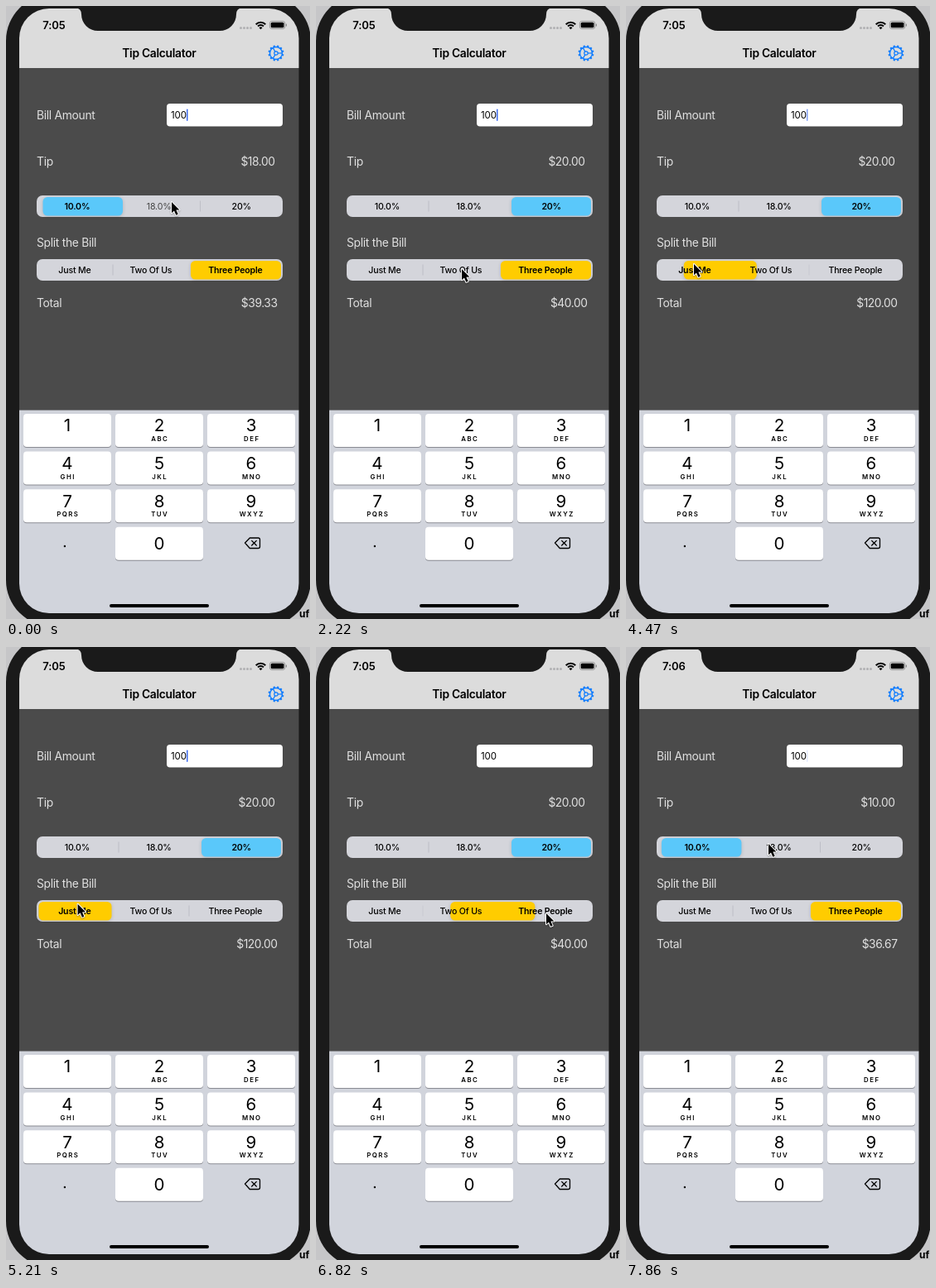
An HTML page with a canvas that plays this animation: 367x741 px, repeating every 8000 ms.

```html
<!DOCTYPE html>
<html lang="en">
<head>
<meta charset="utf-8">
<title>Tip Calculator</title>
<style>
html, body { margin: 0; width: 100%; height: 100%; overflow: hidden; background: #c6c6c8; }
canvas { display: block; width: 367px; height: 741px; }
</style>
</head>
<body>
<canvas id="stage"></canvas>
<script>
const W = 367, H = 741, LOOP = 8000;
const canvas = document.getElementById('stage');
const ctx = canvas.getContext('2d');
const dpr = window.devicePixelRatio || 1;
canvas.width = W * dpr;
canvas.height = H * dpr;

// [step index, ms]: the screen refreshes in even steps between these anchors
const STEPS = [[0, 0], [5, 750], [7, 1050], [9, 1340], [16, 2370], [22, 3270], [30, 4470],
  [38, 5650], [41, 6090], [43, 6380], [50, 7410], [53, 7860], [54, 8000]];

// [ms, x, y] of the pointer tip
const POINTER = [[0, 200, 237], [150, 206, 237], [700, 272, 237], [1195, 273, 237], [1340, 279, 259],
  [1600, 274, 275], [2200, 176, 318], [2520, 174, 321], [2970, 94, 315], [3270, 81, 317],
  [3430, 81, 317], [4470, 82, 312], [5100, 84, 311], [5650, 114, 309], [6090, 181, 308],
  [6240, 181, 308], [6680, 276, 320], [6820, 278, 322], [7000, 272, 318], [7410, 98, 243],
  [7560, 90, 239], [7860, 172, 238], [8000, 196, 237]];

const TIP = {
  y: 229, color: '#5ac8fa', labels: ['10.0%', '18.0%', '20%'], centers: [86, 184.7, 284.3],
  pills: [[39.5, 136], [138, 233.5], [236, 332]], dividers: [136, 234.5],
  taps: [[-1000, 0], [-18, 1], [1225, 2], [7560, 0]]
};
const SPLIT = {
  y: 306, color: '#ffcc00', labels: ['Just Me', 'Two Of Us', 'Three People'], centers: [83, 175, 277],
  pills: [[39.5, 127.5], [131, 219], [223, 332]], dividers: [129, 221],
  taps: [[-1000, 2], [2350, 1], [4355, 0], [6705, 2]]
};
const RATES = [10, 18, 20];

const clamp = v => Math.max(0, Math.min(1, v));
const mix = (a, b, p) => a + (b - a) * p;

function heldTime(t) {
  for (let i = STEPS.length - 2; i >= 0; i--) {
    const [n0, t0] = STEPS[i], [n1, t1] = STEPS[i + 1];
    if (t < t0) continue;
    for (let n = n1; n >= n0; n--) {
      const at = Math.floor(mix(t0, t1, (n - n0) / (n1 - n0)) / 10) * 10;
      if (at <= t) return at;
    }
  }
  return 0;
}

function pointerAt(t) {
  let i = 0;
  while (i < POINTER.length - 2 && t >= POINTER[i + 1][0]) i++;
  const [t0, x0, y0] = POINTER[i], [t1, x1, y1] = POINTER[i + 1];
  const u = clamp((t - t0) / (t1 - t0)), p = u * u * (3 - 2 * u);
  return [mix(x0, x1, p), mix(y0, y1, p)];
}

// Critically damped spring from the previous choice to the current one
function choiceAt(seg, t) {
  let i = 0;
  while (i < seg.taps.length - 1 && t >= seg.taps[i + 1][0]) i++;
  const s = (t - seg.taps[i][0]) / 50;
  const to = seg.taps[i][1];
  return { from: i ? seg.taps[i - 1][1] : to, to, p: 1 - (1 + s) * Math.exp(-s) };
}

function caretAlpha(t) {
  const ph = t % 1000;
  if (ph < 420) return 1;
  return ph < 700 ? clamp((560 - ph) / 140) : clamp((ph - 835) / 165);
}

function box(x, y, w, h, r, color) {
  ctx.fillStyle = color;
  ctx.beginPath();
  ctx.roundRect(x, y, w, h, r);
  ctx.fill();
}

function text(str, x, y, size, { weight = 400, color = '#000', align = 'left', gap = 0 } = {}) {
  ctx.font = `${weight} ${size}px Inter, Roboto, sans-serif`;
  ctx.letterSpacing = gap + 'px';
  ctx.textAlign = align;
  ctx.fillStyle = color;
  const shift = align === 'center' ? gap / 2 : align === 'right' ? gap : 0;
  ctx.fillText(str, x + shift, y);
}

function line(color, width, ...points) {
  ctx.strokeStyle = color;
  ctx.lineWidth = width;
  ctx.beginPath();
  points.forEach(([x, y]) => ctx.lineTo(x, y));
  ctx.stroke();
}

function ring(x, y, r, a0 = 0, a1 = 2 * Math.PI) {
  ctx.beginPath();
  ctx.arc(x, y, r, a0, a1);
  ctx.stroke();
}

function drawPhone() {
  ctx.fillStyle = '#c6c6c8';
  ctx.fillRect(0, 0, W, H);
  text('uf', 354, 739, 12, { weight: 700 });
  box(0, -14, 368, 764, 56, '#1a1a1a');

  ctx.save();
  ctx.beginPath();
  ctx.roundRect(16, 3, 337.5, 731, 36);
  ctx.clip();
  ctx.fillStyle = '#dcdcdc';
  ctx.fillRect(16, 0, 338, 75);
  ctx.fillStyle = '#4b4b4b';
  ctx.fillRect(16, 75, 338, 413.5);
  ctx.fillStyle = '#d1d4dc';
  ctx.fillRect(16, 488.5, 338, 250);
  ctx.restore();

  // notch
  ctx.fillStyle = '#1a1a1a';
  ctx.beginPath();
  ctx.moveTo(84, 2);
  ctx.quadraticCurveTo(91, 3, 91, 10);
  ctx.arcTo(91, 30, 111, 30, 20);
  ctx.arcTo(278, 30, 278, 10, 20);
  ctx.lineTo(278, 10);
  ctx.quadraticCurveTo(278, 3, 285, 2);
  ctx.fill();
  box(125, 723, 120, 4, 2, '#000');
}

function drawStatus(t) {
  text(t < 7700 ? '7:05' : '7:06', 58, 28, 13, { weight: 600, align: 'center', gap: -0.1 });
  for (let i = 0; i < 4; i++) box(282 + i * 4, 25, 3, 3, 1.5, '#b0b0b2');

  ctx.strokeStyle = '#000';
  ctx.lineWidth = 2;
  const a0 = -Math.PI * 0.75, a1 = -Math.PI * 0.25;
  ring(307.5, 28, 8.2, a0, a1);
  ring(307.5, 28, 4.9, a0, a1);
  ctx.fillStyle = '#000';
  ctx.beginPath();
  ctx.moveTo(307.5, 28.3);
  ctx.arc(307.5, 28.3, 2.9, a0, a1);
  ctx.fill();

  ctx.strokeStyle = '#8a8a8a';
  ctx.lineWidth = 0.8;
  ctx.beginPath();
  ctx.roundRect(318.4, 18.4, 18.4, 9.2, 2.6);
  ctx.stroke();
  box(319.7, 19.7, 15.8, 6.6, 1.5, '#000');
  box(337.8, 21.5, 1.2, 3, 0.6, '#8a8a8a');
}

function drawGear(x, y) {
  const polar = (r, a) => [x + r * Math.cos(a), y + r * Math.sin(a)];
  const blue = '#0a7aff';
  for (let i = 0; i < 12; i++) {
    const a = (i + 0.5) * Math.PI / 6;
    line(blue, 2.2, polar(7.6, a), polar(9.5, a));
  }
  ctx.lineWidth = 1.4;
  ring(x, y, 7.5);
  ctx.lineWidth = 1.2;
  ring(x, y, 2.2);
  for (let i = 0; i < 3; i++) {
    const a = i * Math.PI * 2 / 3;
    line(blue, 1.2, polar(2.2, a), polar(7.4, a));
  }
}

function drawSegments(seg, t) {
  const { from, to, p } = choiceAt(seg, t);
  box(37, seg.y, 297, 26, 7, '#d4d5db');

  seg.dividers.forEach((x, i) => {
    const near = k => k === i || k === i + 1 ? 1 : 0;
    const alpha = 1 - Math.max(near(from) * (1 - p), near(to) * p);
    ctx.globalAlpha = alpha * alpha;
    ctx.fillStyle = '#bcbdc5';
    ctx.fillRect(x - 0.5, seg.y + 6.5, 1, 13);
  });
  ctx.globalAlpha = 1;

  const left = mix(seg.pills[from][0], seg.pills[to][0], p);
  const right = mix(seg.pills[from][1], seg.pills[to][1], p);
  ctx.save();
  ctx.shadowColor = 'rgba(0,0,0,0.16)';
  ctx.shadowBlur = 4 * dpr;
  ctx.shadowOffsetY = dpr;
  box(left, seg.y + 2, right - left, 22.5, 5.5, seg.color);
  ctx.restore();

  const bold = p > 0.3 ? to : from;
  seg.labels.forEach((label, i) => {
    const pressed = i === to && bold !== to;
    text(label, seg.centers[i], seg.y + 16.9, 10.6, {
      weight: i === bold ? 600 : pressed ? 400 : 500,
      color: pressed ? '#444' : '#000', align: 'center', gap: -0.2
    });
  });
}

function drawForm(t) {
  const label = { color: '#e0e0e0', gap: -0.3 };
  const value = { color: '#e0e0e0', gap: -0.45, align: 'right' };
  const rate = RATES[choiceAt(TIP, t).to];
  const people = choiceAt(SPLIT, t).to + 1;

  text('Tip Calculator', 185, 62, 13.85, { weight: 600, align: 'center', gap: -0.3 });
  drawGear(326, 57);
  text('Bill Amount', 37, 137, 13.85, label);
  text('Tip', 37, 193, 13.85, label);
  text('Split the Bill', 37, 291, 13.85, label);
  text('Total', 37, 364, 13.85, label);
  text('$' + rate.toFixed(2), 325, 192.5, 13.85, value);
  text('$' + ((100 + rate) / people).toFixed(2), 328, 364, 13.85, value);

  box(194, 118, 140, 27.5, 4, '#fff');
  text('100', 199, 136, 11.5, { gap: -0.1 });
  ctx.globalAlpha = caretAlpha(t);
  box(218, 124.5, 1.5, 14.5, 0.7, '#3c6bf0');
  ctx.globalAlpha = 1;

  drawSegments(TIP, t);
  drawSegments(SPLIT, t);
}

function drawKey(col, row, digit, letters) {
  const x = 21 + col * 111, y = 493 + row * 45.6, mid = x + 53;
  box(x, y + 1, 106, 40, 4, '#898b92');
  box(x, y, 106, 40, 4, '#fff');
  text(digit, mid, y + (digit === '0' ? 26.7 : 21.3), 20.6, { align: 'center' });
  text(letters, mid, y + 33, 7.8, { weight: 600, align: 'center', gap: 1.5 });
}

function drawKeyboard() {
  const letters = ['', 'ABC', 'DEF', 'GHI', 'JKL', 'MNO', 'PQRS', 'TUV', 'WXYZ'];
  letters.forEach((str, i) => drawKey(i % 3, Math.floor(i / 3), String(i + 1), str));
  drawKey(1, 3, '0', '');
  box(69.7, 651.8, 2.4, 2.4, 1.2, '#000');

  ctx.lineJoin = 'round';
  ctx.lineCap = 'round';
  ctx.strokeStyle = '#000';
  ctx.lineWidth = 1.3;
  ctx.beginPath();
  ctx.moveTo(288.5, 649);
  ctx.lineTo(294.3, 643);
  ctx.arcTo(306.5, 643, 306.5, 649, 2);
  ctx.arcTo(306.5, 655.5, 300, 655.5, 2);
  ctx.lineTo(294.3, 655.5);
  ctx.closePath();
  ctx.stroke();
  line('#000', 1.3, [296.7, 646.4], [302.3, 652]);
  line('#000', 1.3, [302.3, 646.4], [296.7, 652]);
  ctx.lineCap = 'butt';
}

function drawPointer(t) {
  const [x, y] = pointerAt(t);
  ctx.save();
  ctx.translate(x, y);
  ctx.beginPath();
  [[0, 0], [0, 13.2], [3, 10.5], [5.3, 15.8], [7.7, 14.8], [5.4, 9.6], [9.4, 9.5]]
    .forEach(([px, py]) => ctx.lineTo(px, py));
  ctx.closePath();
  ctx.strokeStyle = '#fff';
  ctx.lineWidth = 2;
  ctx.lineJoin = 'round';
  ctx.shadowColor = 'rgba(0,0,0,0.3)';
  ctx.shadowBlur = 2 * dpr;
  ctx.shadowOffsetY = dpr;
  ctx.stroke();
  ctx.shadowColor = 'transparent';
  ctx.fillStyle = '#000';
  ctx.fill();
  ctx.restore();
}

function frame(now) {
  const t = heldTime(now % LOOP);
  ctx.setTransform(dpr, 0, 0, dpr, 0, 0);
  drawPhone();
  drawStatus(t);
  drawForm(t);
  drawKeyboard();
  drawPointer(t);
}

const start = performance.now();
function loop() {
  frame(performance.now() - start);
  requestAnimationFrame(loop);
}
loop();
</script>
</body>
</html>
```
